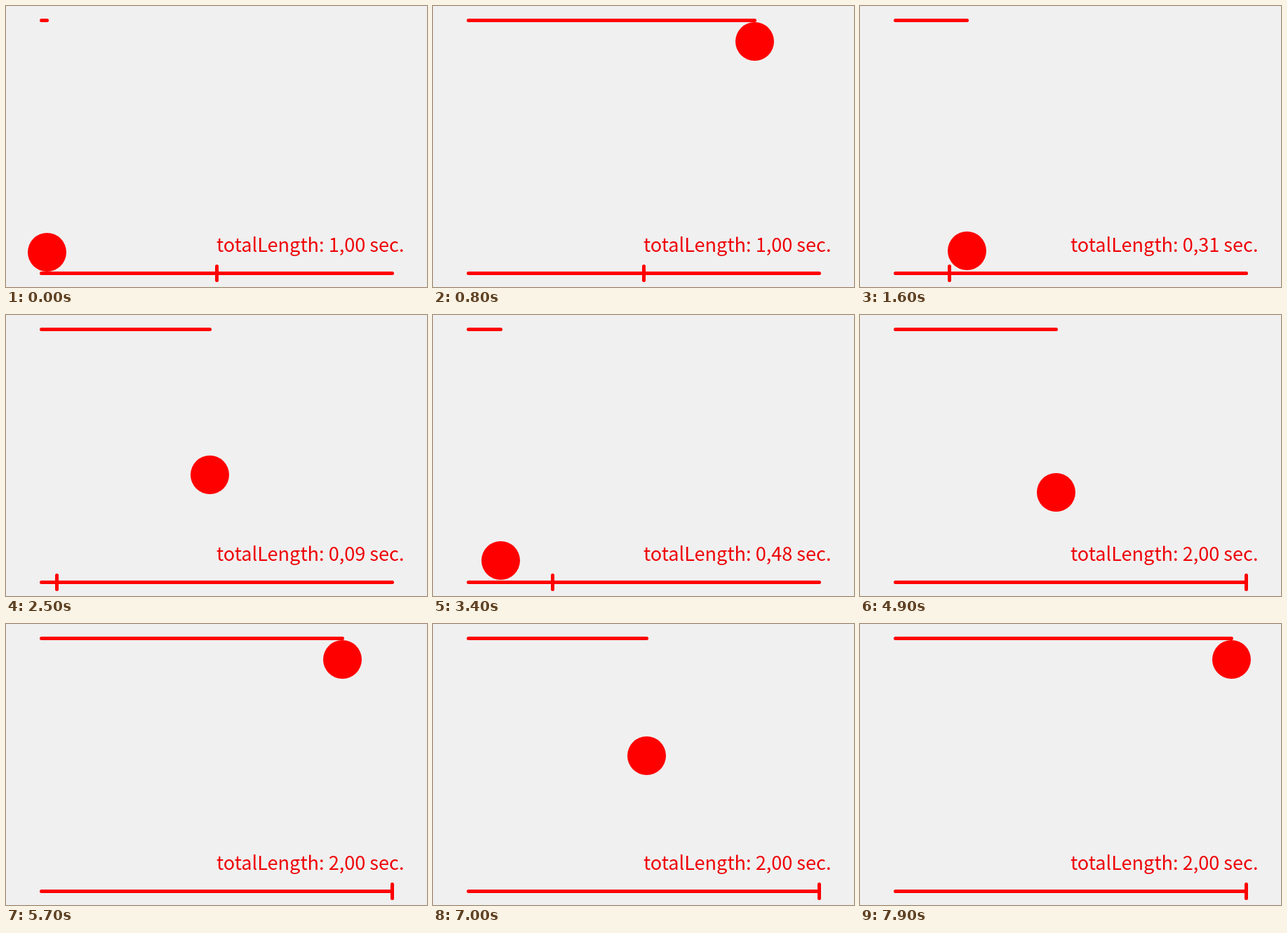
An HTML page with a canvas that plays this animation: 600 px wide and 400 px high, repeating every 8000 ms.

```html
<!DOCTYPE html>
<html lang="en">
<head>
<meta charset="utf-8">
<style>
  html, body { margin: 0; width: 100%; height: 100%; overflow: hidden; background: #f0f0f0; }
  canvas { display: block; }
</style>
</head>
<body>
<canvas id="stage" width="600" height="400"></canvas>
<script>
const ctx = document.getElementById('stage').getContext('2d');
const LOOP = 8000, STEP = 100;

// Dragged slider: [step, length in seconds], linear between points
const drag = [
  [0, 1], [10, 1], [13, .645], [16, .3106], [18, .09158], [29, .09158], [30, .151],
  [34, .4817], [40, .9966], [41, 1.037], [45, 1.404], [49, 2], [80, 2]
];

function lengthAt(step) {
  const i = drag.findIndex(([s]) => s > step);
  const [s0, a] = drag[i - 1], [s1, b] = drag[i];
  return a + (b - a) * (step - s0) / (s1 - s0);
}

const easeInOutQuint = p => p < .5 ? 16 * p ** 5 : 1 - 16 * (1 - p) ** 5;

// Single precision, then whole pixels
const snap = v => Math.floor(Math.fround(v)) + .5;

function line(x0, y0, x1, y1) {
  ctx.beginPath();
  ctx.moveTo(snap(x0), snap(y0));
  ctx.lineTo(snap(x1), snap(y1));
  ctx.stroke();
}

function draw(now) {
  const step = Math.floor(now % LOOP / STEP);
  const total = lengthAt(step);
  const p = (step * 6 + 1) / 60 / total % 1;
  const x = 50 + 500 * p;
  const y = 350 - 300 * easeInOutQuint(p);
  const mark = 50 + 250 * total;

  ctx.fillStyle = '#f0f0f0';
  ctx.fillRect(0, 0, 600, 400);
  ctx.fillStyle = ctx.strokeStyle = '#f00';
  ctx.lineWidth = 5;
  ctx.lineCap = 'round';

  line(50, 20, x, 20);
  line(50, 380, 550, 380);
  line(mark, 370, mark, 390);

  ctx.beginPath();
  ctx.arc(snap(x), snap(y), 27.5, 0, 2 * Math.PI);
  ctx.fill();

  ctx.fillStyle = '#ee0005';
  ctx.font = '27.1px "Noto Sans CJK SC", "Noto Sans CJK JP", "Noto Sans", sans-serif';
  ctx.fillText(`totalLength: ${total.toFixed(2).replace('.', ',')} sec.`, 300, 350);
}

const start = performance.now();
function tick() {
  draw(performance.now() - start);
  requestAnimationFrame(tick);
}
tick();
</script>
</body>
</html>
```
